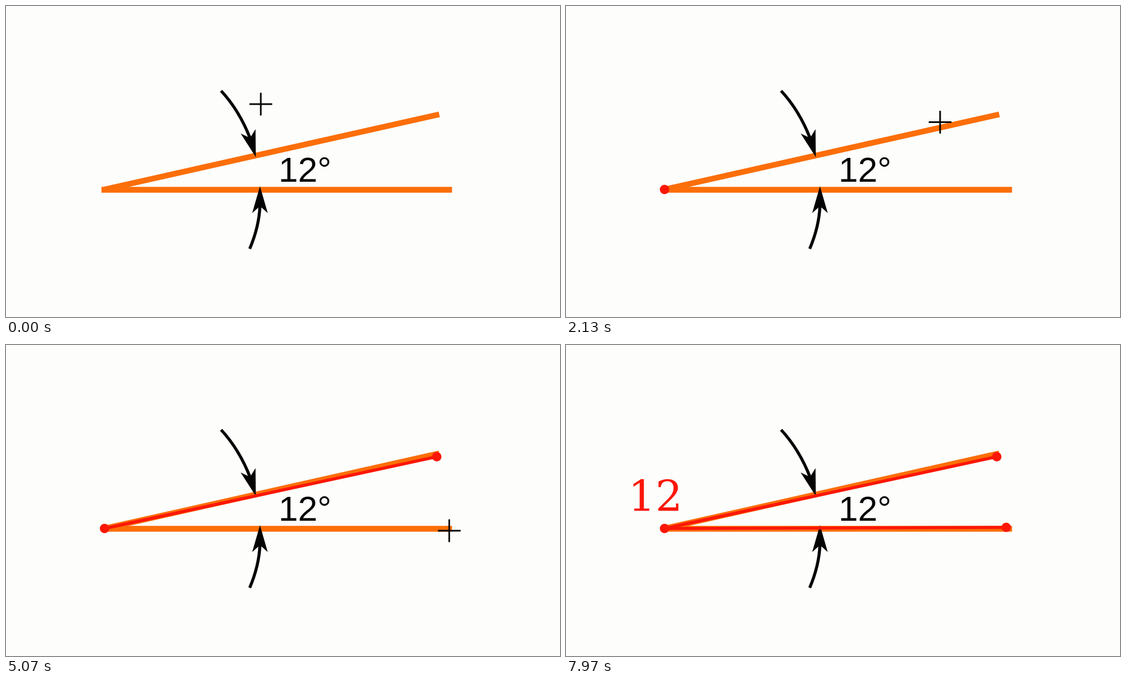
These frames come from a looping animation (998 by 561 pixels, 8 s). An HTML page with a canvas:

```html
<!DOCTYPE html>
<html lang="en">
<head>
<meta charset="utf-8">
<title>Angle measurement</title>
<style>
  html, body { margin: 0; width: 100%; height: 100%; overflow: hidden; background: #fdfdfc; }
  canvas { display: block; }
</style>
</head>
<body>
<canvas id="stage" width="998" height="561"></canvas>
<script>
const ctx = document.getElementById('stage').getContext('2d');
const LOOP = 8000, CURSOR_GONE = 7760;
const PAPER = '#fdfdfc', ORANGE = '#fc6e09', RED = '#fb1706', BLACK = '#050505';

const point = (x, y) => ({ x, y });
const vertex = point(177.5, 331);
const marks = [
  { at: 1350, pos: vertex },
  { at: 3200, pos: point(776, 201.5) },
  { at: 6850, pos: point(793, 329) }
];

// Each pointer move eases to a place, bowing sideways by bend pixels.
const home = point(459, 177);
const moves = [
  { from: 30, until: 900, to: point(176.5, 328), bend: 0 },
  { from: 1480, until: 2352, to: point(771.5, 199.5), bend: 20 },
  { from: 3300, until: 3900, to: point(791.5, 323.5), bend: 45 },
  { from: 4170, until: 4600, to: point(798.5, 335), bend: 0 },
  { from: 6300, until: 6700, to: point(793, 326), bend: 0 },
  { from: 7050, until: 7900, to: point(908, 450), bend: 15 }
];

function cursorAt(t) {
  let pos = home;
  for (const { from, until, to, bend } of moves) {
    if (t < from) break;
    const u = Math.min(1, (t - from) / (until - from));
    const e = u * u * (3 - 2 * u);
    const dx = to.x - pos.x, dy = to.y - pos.y;
    const bow = bend * 4 * e * (1 - e) / Math.hypot(dx, dy);
    pos = point(pos.x + dx * e + dy * bow, pos.y + dy * e - dx * bow);
  }
  return pos;
}

function line(a, b, width, color) {
  ctx.strokeStyle = color;
  ctx.lineWidth = width;
  ctx.beginPath();
  ctx.moveTo(a.x, a.y);
  ctx.lineTo(b.x, b.y);
  ctx.stroke();
}

function dot({ x, y }) {
  ctx.fillStyle = RED;
  ctx.beginPath();
  ctx.arc(x, y, 8.5, 0, Math.PI * 2);
  ctx.fill();
}

// A curved tail that ends in a swept-back head pointing along angle.
function arrow(start, bend, tip, angle) {
  const neck = point(tip.x - 35 * Math.cos(angle), tip.y - 35 * Math.sin(angle));
  ctx.strokeStyle = ctx.fillStyle = BLACK;
  ctx.lineWidth = 5.5;
  ctx.beginPath();
  ctx.moveTo(start.x, start.y);
  ctx.quadraticCurveTo(bend.x, bend.y, neck.x, neck.y);
  ctx.stroke();

  ctx.save();
  ctx.translate(tip.x, tip.y);
  ctx.rotate(angle);
  ctx.beginPath();
  ctx.moveTo(0, 0);
  ctx.lineTo(-48.5, -14);
  ctx.lineTo(-36, 0);
  ctx.lineTo(-48.5, 14);
  ctx.fill();
  ctx.restore();
}

function text(str, x, y, font, color) {
  ctx.font = font;
  ctx.fillStyle = color;
  ctx.fillText(str, x, y);
}

function drawFigure() {
  ctx.fillStyle = PAPER;
  ctx.fillRect(0, 0, 998, 561);
  line(point(175, 331.5), point(780.5, 195.5), 10.5, ORANGE);
  line(point(172, 331.5), point(803.5, 331.5), 10.5, ORANGE);
  arrow(point(387.5, 153), point(420, 188), point(450, 272.5), 1.28);
  arrow(point(439, 438), point(456, 398), point(457.5, 325), -Math.PI / 2);
  text('12°', 491, 317, '63px "Liberation Sans", Arial, sans-serif', BLACK);
}

function drawMarks(t) {
  const shown = marks.filter(m => t >= m.at);
  shown.slice(1).forEach(m => line(vertex, m.pos, 5.5, RED));
  shown.forEach(m => dot(m.pos));
  if (shown.length === marks.length) {
    text('12', 112, 298.5, '77px "DejaVu Serif", serif', RED);
  }
}

function drawCursor(t) {
  if (t >= CURSOR_GONE) return;
  const { x, y } = cursorAt(t);
  line(point(x - 20.5, y), point(x + 20.5, y), 3, BLACK);
  line(point(x, y - 20.5), point(x, y + 20.5), 3, BLACK);
}

function frame() {
  const t = performance.now() % LOOP;
  drawFigure();
  drawMarks(t);
  drawCursor(t);
  requestAnimationFrame(frame);
}
frame();
</script>
</body>
</html>
```
